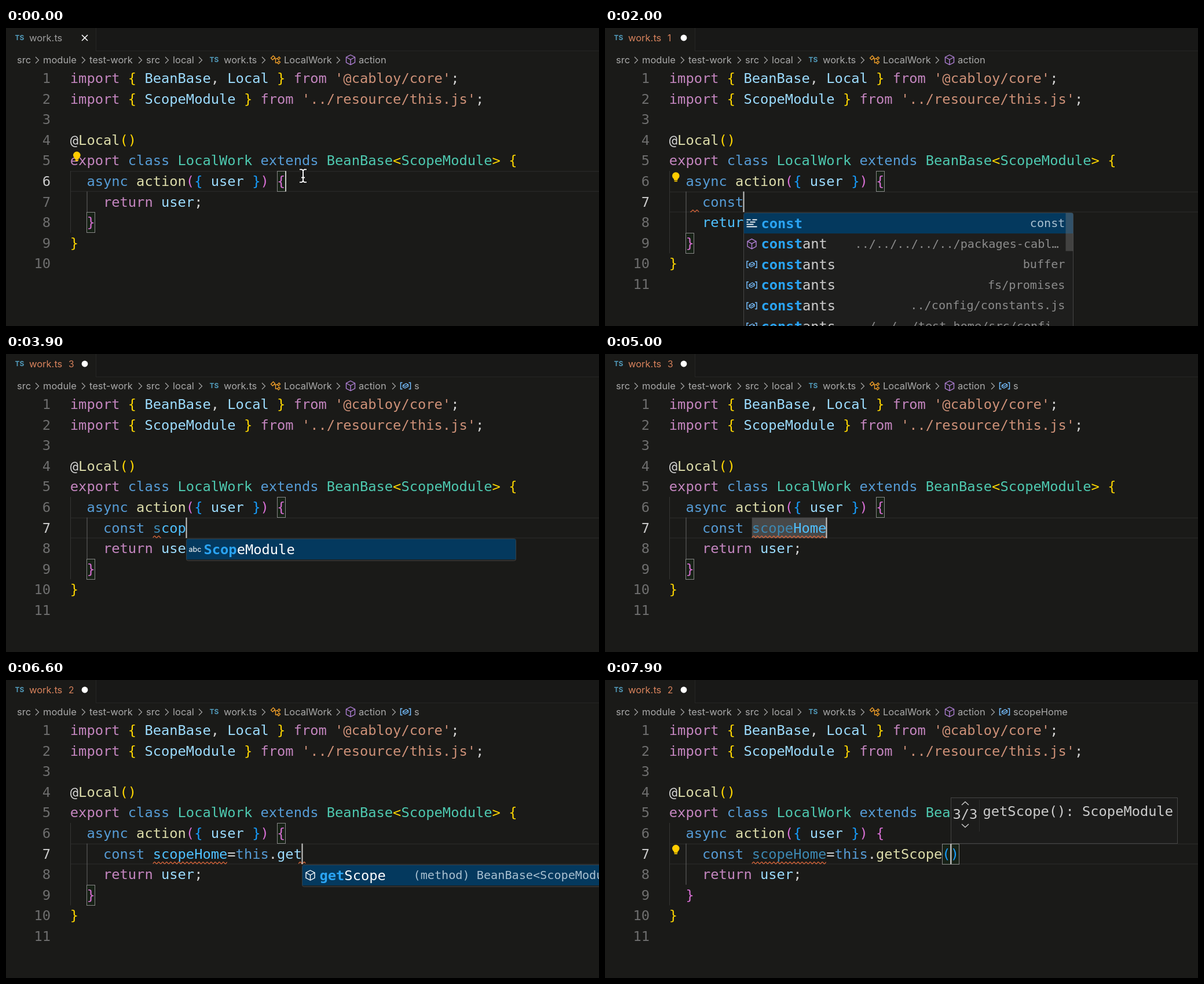
Animation of 1024 by 515 pixels, one loop 8000 ms. Source, as an HTML page with a canvas:

```html
<!DOCTYPE html>
<html lang="en">
<head>
<meta charset="utf-8">
<title>Editor typing</title>
<style>
html, body { margin: 0; width: 100%; height: 100%; overflow: hidden; background: #1a1a18; }
canvas { display: block; width: 100vw; height: 100vh; }
</style>
</head>
<body>
<canvas id="stage" width="1024" height="515"></canvas>
<script>
const ctx = document.getElementById('stage').getContext('2d');
const LOOP = 8000, ADV = 14.29, LEFT = 110.8, TOP = 69, ROW = 35.6;
const MONO = '"DejaVu Sans Mono", monospace', SANS = 'Inter, sans-serif';
const CODE = `23.74px ${MONO}`, SMALL = `20.18px ${MONO}`, UI = `16.5px ${SANS}`;
const BG = '#1a1a18', BLUE = '#75beff', PURPLE = '#b180d7', ERROR = '#d9673c';
const INK = {
  p: '#c586c0', y: '#ffd700', v: '#9cdcfe', o: '#ce9178', w: '#d4d4d4', k: '#569cd6',
  f: '#dcdcaa', t: '#4ec9b0', b: '#179fff', m: '#da70d6', c: '#4fc1ff', d: '#3d89b3'
};

const HEAD = [
  ['p', 'import ', 'y', '{ ', 'v', 'BeanBase', 'w', ', ', 'v', 'Local ', 'y', '} ', 'p', 'from ', 'o', "'@cabloy/core'", 'w', ';'],
  ['p', 'import ', 'y', '{ ', 'v', 'ScopeModule ', 'y', '} ', 'p', 'from ', 'o', "'../resource/this.js'", 'w', ';'],
  [],
  ['w', '@', 'f', 'Local', 'y', '()'],
  ['p', 'export ', 'k', 'class ', 't', 'LocalWork ', 'k', 'extends ', 't', 'BeanBase', 'y', '<', 't', 'ScopeModule', 'y', '> {'],
  ['k', '  async ', 'f', 'action', 'm', '(', 'b', '{ ', 'v', 'user ', 'b', '}', 'm', ') {']
];

// What has been typed on line 7, by time.
const KEYS = [
  [300, ''], [1500, 'c'], [1600, 'co'], [1700, 'con'], [1800, 'cons'], [1900, 'const'], [2100, 'const '],
  [2500, 'const s'], [3400, 'const sc'], [3600, 'const sco'], [3800, 'const scop'], [4000, 'const scope'],
  [4500, 'const scopeH'], [4600, 'const scopeHo'], [4700, 'const scopeHom'], [4800, 'const scopeHome'],
  [5300, 'const scopeHome='], [5400, 'const scopeHome=t'], [5500, 'const scopeHome=th'],
  [5600, 'const scopeHome=thi'], [5700, 'const scopeHome=this'], [5800, 'const scopeHome=this.'],
  [6200, 'const scopeHome=this.g'], [6300, 'const scopeHome=this.ge'], [6400, 'const scopeHome=this.get'],
  [7100, 'const scopeHome=this.getScope'], [7500, 'const scopeHome=this.getScope(']
];

// Time, number of dimmed letters, underlined column spans.
const CHECKS = [
  [0, 0], [1600, 0, [2.55, 3.6]], [2300, 0], [2700, 1, [10, 11]], [4300, 5, [10, 15]], [4900, 5, [10, 19]],
  [5400, 5, [10, 15]], [5700, 5, [10, 15], [20, 24]], [6300, 0, [10, 19], [27.6, 28.5]], [7600, 9, [10, 19]]
];

const CONSTS = [
  ['keyword', 'const', 'const'], ['cube', 'constant', '../../../../../packages-cabl…'],
  ['variable', 'constants', 'buffer'], ['variable', 'constants', 'fs/promises'],
  ['variable', 'constants', '../config/constants.js'], ['variable', 'constants', '../../../test-home/src/confi…']
];
const SNIPPETS = [
  ['snippet', 'set', 'Property setter'], ['snippet', 'settimeout', 'Set Timeout Function'],
  ['snippet', 'switch', 'Switch Statement'], ['abc', 'ScopeModule', ''],
  ['snippet', 'cabloy schedule', 'Cabloy Schedule'], ['snippet', 'cabloy sequence', 'Cabloy Sequence']
];
const MEMBERS = [
  ['cube', 'action', '(method) LocalWork.action({ …'], ['field', 'app', ''], ['field', 'bean', ''],
  ['field', 'ctx', ''], ['cube', 'getScope', '(method) BeanBase<ScopeModule>.getScope'], ['field', 'moduleBelong', '']
];
const POPUPS = [
  [1600, 2100, CONSTS], [2700, 4500, SNIPPETS],
  [5500, 5800, [['keyword', 'this', 'this']]], [5800, 7100, MEMBERS]
];

const colX = col => LEFT + col * ADV;
const rowY = row => TOP + row * ROW;
const latest = (list, t) => list.filter(e => e[0] <= t).pop();

function text(str, x, y, font, color) {
  ctx.font = font;
  ctx.fillStyle = color;
  ctx.fillText(str, x, y);
}
function rect(x, y, w, h, color) {
  ctx.fillStyle = color;
  ctx.fillRect(x, y, w, h);
}
function path(points, color, width = 1.3, close = false) {
  ctx.beginPath();
  points.forEach(([x, y]) => ctx.lineTo(x, y));
  if (close) ctx.closePath();
  ctx.strokeStyle = color;
  ctx.lineWidth = width;
  ctx.stroke();
}
function disc(x, y, r, color) {
  ctx.beginPath();
  ctx.arc(x, y, r, 0, 7);
  ctx.fillStyle = color;
  ctx.fill();
}
function code(row, parts, col = 0) {
  for (let i = 0; i < parts.length; i += 2) {
    text(parts[i + 1], colX(col), rowY(row) + 26, CODE, INK[parts[i]]);
    col += parts[i + 1].length;
  }
}

const ICONS = {
  cube(x, y, color) {
    const at = (dx, dy) => [x + dx, y + dy];
    path([at(0, -8.5), at(7.5, -4.5), at(7.5, 4.5), at(0, 8.5), at(-7.5, 4.5), at(-7.5, -4.5)], color, 1.4, true);
    path([at(-7.5, -4.5), at(0, -0.5), at(7.5, -4.5)], color, 1.4);
    path([at(0, -0.5), at(0, 8.5)], color, 1.4);
  },
  field(x, y, color) {
    const at = (dx, dy) => [x + dx, y + dy];
    path([at(1.5, -7), at(8.5, -3.5), at(8.5, 2.5), at(-1.5, 7.5), at(-8.5, 4), at(-8.5, -2)], color, 1.5, true);
    path([at(-8.5, -2), at(-1.5, 1.5), at(8.5, -3.5)], color, 1.5);
    path([at(-1.5, 1.5), at(-1.5, 7.5)], color, 1.5);
  },
  variable(x, y, color) {
    for (const s of [-1, 1]) {
      path([[x + s * 5.5, y - 5.5], [x + s * 8.5, y - 5.5], [x + s * 8.5, y + 5.5], [x + s * 5.5, y + 5.5]], color, 1.5);
    }
    const at = (dx, dy) => [x + dx, y + dy];
    path([at(1, -4), at(4.5, -2), at(4.5, 1), at(-1, 4), at(-4.5, 2), at(-4.5, -1)], color, 1.3, true);
    path([at(-4.5, -1), at(-1, 1), at(4.5, -2)], color, 1.2);
  },
  keyword(x, y, color) {
    [[-9, 7], [1, 8], [-9, 3], [-9, 12], [-9, 18]].forEach(([dx, w], i) =>
      rect(x + dx, y - 7 + [0, 0, 4, 8, 12][i], w, 1.8, color));
    rect(x - 3, y - 3, 9, 1.8, color);
  },
  snippet(x, y, color) {
    path([[x - 8, y + 8], [x - 8, y - 8], [x + 8, y - 8], [x + 8, y + 8]], color, 1.7);
    for (let i = -8; i <= 8; i += 4) rect(x + i - 1, y + 7, 2, 2, color);
  },
  abc(x, y, color) {
    text('abc', x - 10, y + 4, `12.5px ${SANS}`, color);
  },
  type(x, y, color) {
    path([[x - 8, y - 3], [x - 4, y - 7], [x - 1, y - 4], [x - 5, y], [x - 8, y - 3]], color, 1.4, true);
    path([[x - 3, y - 2], [x + 3, y - 2]], color, 1.4);
    path([[x, y - 2], [x, y + 5], [x + 3, y + 5]], color, 1.4);
    for (const dy of [-2, 5]) {
      path([[x + 3, y + dy], [x + 6, y + dy - 3], [x + 8, y + dy - 1], [x + 5, y + dy + 2]], color, 1.4, true);
    }
  }
};

function drawTab(t) {
  rect(155, 0, 869, 39, '#181817');
  rect(155, 0, 1, 39, '#252524');
  rect(155, 39, 869, 1, '#252524');
  const count = t < 1500 ? '' : t < 2400 ? '1' : t < 6500 ? '3' : '2';
  const color = count ? '#d7825c' : '#9d9d9d';
  text('TS', 15.5, 21, `bold 12px ${SANS}`, '#519aba');
  text('work.ts', 40, 23, UI, color);
  text(count, 108, 23, `15.5px ${SANS}`, color);
  if (t < 300) {
    path([[131, 12], [141, 22]], '#fff', 1.6);
    path([[141, 12], [131, 22]], '#fff', 1.6);
  } else disc(136, 17, 5.4, '#fff');
}

function drawCrumbs(t) {
  const grey = '#a9a9a9';
  const words = [['src', 19], ['module', 64], ['test-work', 144], ['src', 242], ['local', 288],
    ['work.ts', 376], ['LocalWork', 480], ['action', 609]];
  const arrows = [54, 134, 232, 278, 336, 445, 574];
  if (t >= 3800) {
    words.push([t < 7700 ? 's' : 'scopeHome', 705]);
    arrows.push(670);
    ICONS.variable(690, 55, BLUE);
  }
  words.forEach(([word, x]) => text(word, x, 61, UI, grey));
  arrows.forEach(x => path([[x - 3, 50], [x + 2.5, 55.5], [x - 3, 61]], grey, 1.2));
  text('TS', 351.5, 59, `bold 12px ${SANS}`, '#519aba');
  ICONS.type(465.5, 55, '#ee9d28');
  ICONS.cube(595, 55, PURPLE);
}

function bracketBox(row, col) {
  const x = Math.round(colX(col)) + 0.5, y = Math.round(rowY(row)) + 0.5;
  rect(x, y, 14, 35, 'rgba(0,100,0,.1)');
  ctx.strokeStyle = '#888';
  ctx.lineWidth = 1;
  ctx.strokeRect(x, y, 14, 35);
}

function squiggle(from, to) {
  const points = [], y = rowY(6) + 33.5;
  for (let x = colX(from); x <= colX(to); x++) points.push([x, y + 1.6 * Math.sin(x * 0.9)]);
  path(points, ERROR, 1.3);
}

function drawBulb(row) {
  const x = 122.3, y = rowY(row) + 8.5;
  disc(x, y, 6.3, '#ffcc00');
  rect(x - 3.2, y + 4, 6.4, 3.5, '#ffcc00');
  rect(x - 2.6, y + 8.2, 5.2, 1.8, '#ffcc00');
}

function drawPointer(x, y) {
  for (const [color, width] of [['#000', 4.5], ['#fff', 2]]) {
    path([[x, y - 9], [x, y + 9]], color, width);
    for (const s of [-1, 1]) path([[x - 6, y + s * 11], [x - 2, y + s * 11], [x, y + s * 9], [x + 2, y + s * 11], [x + 6, y + s * 11]], color, width);
    path([[x - 3, y + 3], [x + 3, y + 3]], color, width);
  }
}

function typedParts(typed, dim) {
  const [, word, name, eq, self, dot, call, paren] = typed.match(/^(\w*)( ?\w*)(=?)(\w*)(\.?)(\w*)(\(?)$/);
  const cut = dim ? dim + 1 : 0;
  return ['k', word, 'd', name.slice(0, cut), 'c', name.slice(cut), 'w', eq, 'k', self, 'w', dot,
    call === 'getScope' ? 'f' : 'v', call, 'b', paren && '()'];
}

// Positions of the query letters in the label, starting at a word; null when they do not fit.
function fuzzy(label, query) {
  const low = label.toLowerCase(), hits = [];
  let at = query ? low.search(new RegExp('\\b' + query[0])) : 0;
  for (const ch of query.toLowerCase()) {
    at = at < 0 ? -1 : low.indexOf(ch, at);
    if (at < 0) return null;
    hits.push(at++);
  }
  return hits;
}

function drawPopup(pool, typed, col) {
  const query = typed.match(/\w*$/)[0];
  const span = h => h.length ? h[h.length - 1] - h[0] : 0;
  const items = pool.map(item => [item, fuzzy(item[1], query)]).filter(e => e[1])
    .sort((a, b) => span(a[1]) - span(b[1]));
  const x = Math.round(colX(col)) + 0.5, y = 319.5, h = items.length * ROW + 2;
  ctx.save();
  ctx.beginPath();
  ctx.roundRect(x, y, 569, h, 3);
  ctx.fillStyle = '#1e1e1d';
  ctx.fill();
  ctx.strokeStyle = '#454545';
  ctx.lineWidth = 1;
  ctx.stroke();
  ctx.clip();
  items.forEach(([[icon, label, detail], hits], i) => {
    const top = y + i * ROW, selected = i === 0;
    if (selected) rect(x, top, 569, ROW, '#04395e');
    const tint = selected ? '#fff' : icon === 'cube' ? PURPLE : icon === 'field' || icon === 'variable' ? BLUE : '#ccc';
    ICONS[icon](x + 14, top + 18, tint);
    [...label].forEach((ch, n) => {
      const hit = hits.includes(n);
      text(ch, x + 30 + n * ADV, top + 26, (hit ? 'bold ' : '') + CODE, hit ? '#2aa4f4' : selected ? '#fff' : '#ccc');
    });
    if (selected || detail[0] !== '(') {
      ctx.font = SMALL;
      const dx = detail.length >= 29 ? 192 : 555 - ctx.measureText(detail).width;
      text(detail, x + dx, top + 24.5, SMALL, selected ? '#a9c0d0' : '#8b8b8b');
    }
  });
  if (pool === CONSTS) rect(x + 556, y, 13, 66, 'rgba(121,121,121,.4)');
  ctx.restore();
}

function drawHint() {
  rect(597, 203, 392, 80, '#1c1c1b');
  ctx.strokeStyle = '#454545';
  ctx.lineWidth = 1;
  ctx.strokeRect(597.5, 203.5, 391, 79);
  rect(646, 207, 1, 55, '#2c2c2b');
  text('3/3', 600.5, 240, CODE, '#ccc');
  path([[616, 216], [622, 210.5], [628, 216]], '#ccc', 1.4);
  path([[616, 249], [622, 254.5], [628, 249]], '#ccc', 1.4);
  text('getScope(): ScopeModule', 652.5, 235, CODE, '#ccc');
}

function drawCode(t) {
  const [keyTime, typed] = latest(KEYS, t) || [-400, null];
  const added = typed === null ? 0 : 1, active = 5 + added;
  const col = added ? 4 + typed.length : 26;
  const [, dim, ...spans] = latest(CHECKS, t);
  const calling = t >= 7500;

  rect(111, rowY(active), 913, 1.5, '#272726');
  rect(111, rowY(active + 1) - 1, 913, 1.5, '#272726');
  rect(111, rowY(5), 1, ROW * (3 + added), '#353534');
  rect(139.5, rowY(6), 1, ROW * (1 + added), '#666');

  if (t >= 2700 && t < 3400 || t >= 4900 && t < 5300) {
    rect(colX(10), rowY(6), (typed.length - 6) * ADV, ROW, '#484848');
  }
  if (calling) {
    bracketBox(6, 33);
    bracketBox(6, 34);
  } else {
    bracketBox(5, 25);
    bracketBox(7 + added, 2);
  }

  ctx.textAlign = 'right';
  for (let i = 0; i < 10 + added; i++) {
    text(i + 1, 77, rowY(i) + 26, CODE, i === active ? '#ccc' : '#6e6e6e');
  }
  ctx.textAlign = 'left';

  HEAD.forEach((parts, row) => code(row, parts));
  if (added) code(6, typedParts(typed, dim), 4);
  const merged = t >= 1900 && t < 2100;
  code(6 + added, [merged ? 'c' : 'p', 'return ', 'v', 'user', 'w', ';'], 4);
  code(7 + added, ['m', '}'], 2);
  code(8 + added, ['y', '}']);

  spans.forEach(([from, to]) => squiggle(from, to));
  if (t < 1100) drawBulb(4);
  else if (t < 2300) drawBulb(5);
  else if (t >= 7800) drawBulb(6);

  if (Math.floor((t - keyTime) / 500) % 2 === 0) {
    rect(Math.round(colX(col)) - (added ? 0.5 : 0), rowY(active), 2, ROW, '#c8c8c6');
  }
  const popup = POPUPS.find(([from, to]) => t >= from && t < to);
  if (popup) drawPopup(popup[2], typed, col);
  if (calling) drawHint();
  if (t < 300) drawPointer(513, 255.5);
}

function frame() {
  const t = performance.now() % LOOP;
  rect(0, 0, 1024, 515, BG);
  drawTab(t);
  drawCrumbs(t);
  drawCode(t);
  requestAnimationFrame(frame);
}
frame();
</script>
</body>
</html>
```
